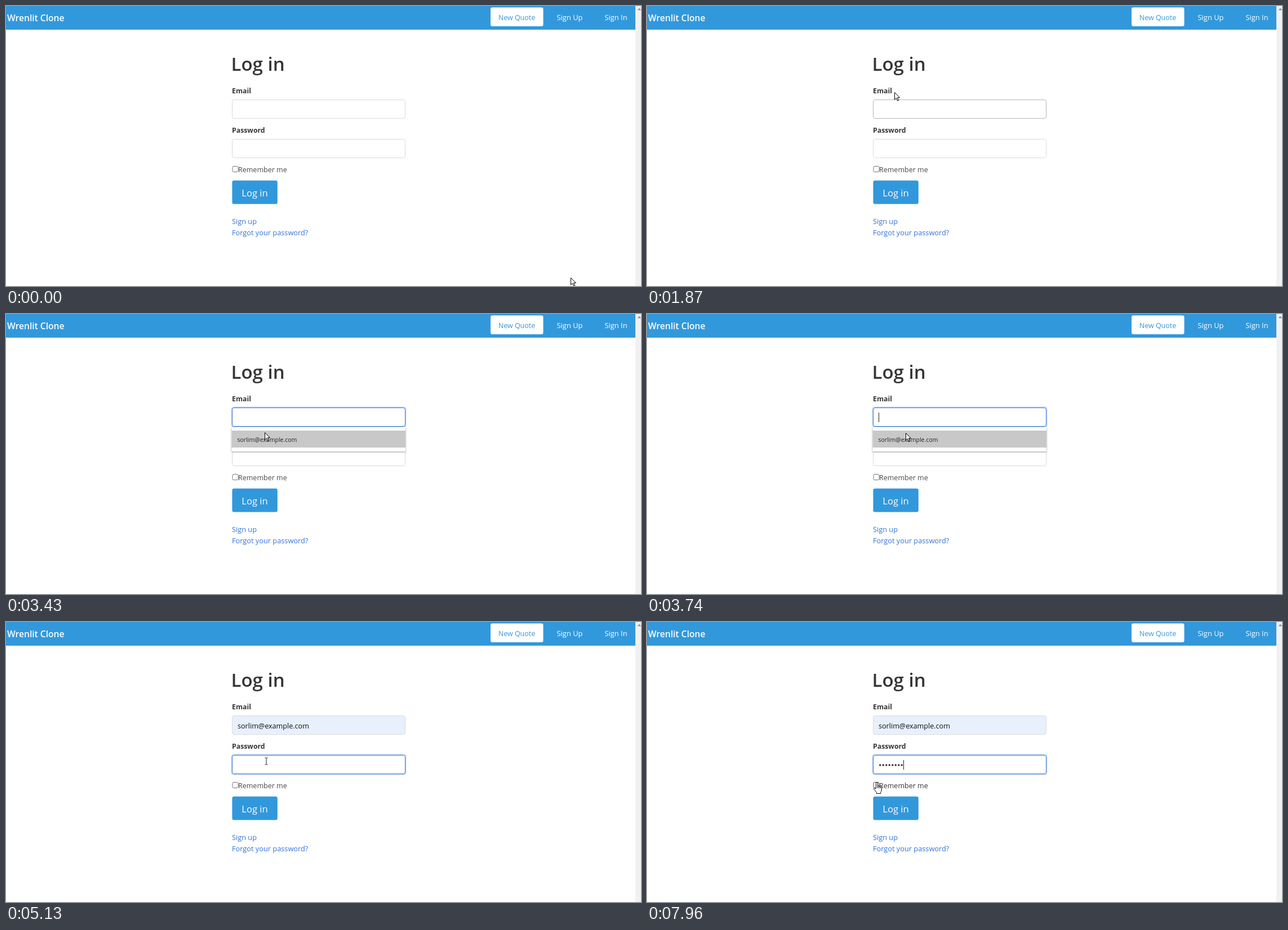
Write an HTML page that moves like this. It is 1127 px wide and 497 px high and loops after 8000 ms.

```html
<!DOCTYPE html>
<html lang="en">
<head>
<meta charset="utf-8">
<title>Log in</title>
<style>
  html, body { margin: 0; width: 100%; height: 100%; overflow: hidden; background: #fff; }
  svg { display: block; width: 1127px; height: 497px; font: 12.6px "Open Sans", "Noto Sans", sans-serif; }
  .label { font-weight: 700; font-size: 12.3px; fill: #363636; }
  .link { font-size: 12.75px; fill: #3273dc; }
  .nav { font-size: 12.9px; fill: #fff; text-anchor: middle; }
  .field { fill: #fff; stroke: #dbdbdb; }
  .field.hover { stroke: #b5b5b5; }
  .field.filled { fill: #e8f0fe; }
  .field.focus { stroke: #3273dc; }
  .ring { fill: none; stroke: #3273dc; stroke-opacity: .25; stroke-width: 3.33; }
  #menu > rect:first-child { filter: drop-shadow(0 1px 1.5px rgba(0, 0, 0, .4)); }
  .pointer { fill: #fff; stroke: #000; stroke-width: 1; stroke-linejoin: round; }
</style>
</head>
<body>
<svg viewBox="0 0 1127 497">
  <rect width="1117" height="42" fill="#3298dc"/>
  <text x="2" y="26.5" font-size="15.6" font-weight="600" fill="#fff">Wrenlit Clone</text>
  <rect x="860" y="2.5" width="93.5" height="33.5" rx="3.3" fill="#fff"/>
  <text class="nav" x="906.5" y="24.5" style="fill:#3298dc;font-size:12.5px">New Quote</text>
  <text class="nav" x="1000.5" y="24.5">Sign Up</text>
  <text class="nav" x="1082.5" y="24.5">Sign In</text>
  <rect x="1117" width="10" height="497" fill="#f1f1f1"/>
  <path d="M1120.5 7.5l3.5-4 3 4z" fill="#8a93ad"/>

  <text x="399.5" y="114.5" font-size="33" font-weight="600" fill="#363636">Log in</text>
  <text class="label" x="401" y="154.5">Email</text>
  <text class="label" x="401" y="224.5">Password</text>

  <rect class="ring" id="emailRing" x="401" y="166" width="308" height="34" rx="3.5"/>
  <rect class="field" id="email" x="401.5" y="166.5" width="307" height="33" rx="3.3"/>
  <text id="address" x="411" y="188.5" fill="#111">sorlim@example.com</text>
  <path id="squiggle" fill="none" stroke="#e33" stroke-width=".9"/>

  <rect class="ring" id="passwordRing" x="401" y="236" width="308" height="34" rx="3.5"/>
  <rect class="field" id="password" x="401.5" y="236.5" width="307" height="33" rx="3.3"/>
  <g id="dots" fill="#363636"></g>
  <rect id="caret" width="1" height="17" fill="#222"/>

  <rect id="box" x="402" y="284.5" width="10" height="10" rx="2" fill="#fff" stroke="#767676"/>
  <text id="remember" x="412" y="294.7" font-size="12.5">Remember me</text>
  <rect x="401.4" y="309.8" width="80.4" height="41.7" rx="3.3" fill="#3298dc"/>
  <text x="441.5" y="337.5" font-size="16.6" fill="#fff" text-anchor="middle">Log in</text>
  <text class="link" x="401" y="386.7">Sign up</text>
  <text class="link" x="401" y="406.7">Forgot your password?</text>

  <g id="menu">
    <rect x="400.5" y="201" width="308.5" height="43" fill="#fff"/>
    <rect id="option" x="400.5" y="207" width="308.5" height="30" fill="#c8c8c8"/>
    <text x="410.5" y="226.5" font-size="10.5" fill="#222">sorlim@example.com</text>
  </g>

  <path class="pointer" id="arrow" d="M.5.5v12.6l3-2.8 2.2 5 2-.9-2.2-4.8h4z"/>
  <path id="beam" fill="none" stroke="#222" d="M-2.5-6h2l.5.5.5-.5h2M0-5.5v11M-2.5 6h2l.5-.5.5.5h2"/>
  <path class="pointer" id="hand" d="M-1.5 10V1.2Q-1.4-.5 0-.5t1.5 1.7V6Q3 4.8 4 6.6 5.5 5.6 6.3 7.3 8 6.6 8.3 8.5V13Q8 16 6.5 17.5V19.5H-.5V17.8L-5 12Q-6 10-4.5 9.5-3.2 9.2-1.5 11.5M1.5 6v4M4 6.6V10M6.3 7.3V10"/>
</svg>
<script>
const DURATION = 8000;
const DOT_PITCH = 5.5, TEXT_LEFT = 411;
const typed = [5760, 5830, 6060, 6300, 6380, 6530, 6610, 6760];

// Stepped mouse moves: first step time, last step time, steps, end x, end y
const start = [1002, 482];
const moves = [
  [70, 70, 1, 937, 447],
  [310, 790, 8, 710, 332],
  [1170, 1640, 7, 476, 90],
  [1720, 1870, 3, 439, 153],
  [1950, 1950, 1, 439, 160],
  [2020, 2100, 2, 439, 171],
  [2250, 2410, 3, 444, 165],
  [2590, 2710, 3, 445, 168],
  [3200, 3430, 4, 459, 210],
  [3510, 3900, 6, 459, 211],
  [4080, 4440, 6, 462, 247],
  [7390, 7960, 8, 408, 285],
];

const el = Object.fromEntries([...document.querySelectorAll('[id]')].map(e => [e.id, e]));
const show = (e, on) => e.setAttribute('visibility', on ? 'visible' : 'hidden');
const between = (v, a, b) => v >= a && v < b;

for (let i = 0; i < typed.length; i++) {
  const dot = document.createElementNS(el.dots.namespaceURI, 'circle');
  dot.setAttribute('cx', TEXT_LEFT + DOT_PITCH * (i + .5));
  dot.setAttribute('cy', 254);
  dot.setAttribute('r', 1.8);
  el.dots.append(dot);
}

const userWidth = el.address.getSubStringLength(0, 6);
el.squiggle.setAttribute('d', `M${TEXT_LEFT} 191.5` + 'l2-2 2 2'.repeat(Math.round(userWidth / 4)));

function mouseAt(t) {
  let [x, y] = start;
  for (const [from, to, steps, endX, endY] of moves) {
    if (t < from) break;
    const interval = (to - from) / Math.max(1, steps - 1);
    const step = t >= to ? steps : Math.floor((t - from) / interval) + 1;
    x += (endX - x) * step / steps;
    y += (endY - y) * step / steps;
  }
  return [x, y];
}

function caretOn(t) {
  return between(t, 2590, 3200) || between(t, 3730, 4430) || between(t, 4590, 5130) ||
    between(t, 5680, 7310) || t >= 7840;
}

function render(t) {
  const [x, y] = mouseAt(t);
  const menuOpen = between(t, 2650, 3900);
  const filled = t >= 3900;
  const emailFocus = between(t, 2590, 4590);
  const passwordFocus = t >= 4590;
  const count = typed.filter(time => t >= time).length;

  const inColumn = between(x, 401, 709);
  const overEmail = inColumn && between(y, 163, 200);
  const overPassword = inColumn && !menuOpen && between(y, 236, 270);
  const overRemember = between(x, 401, 498) && between(y, 280, 300);

  el.email.classList.toggle('hover', overEmail || inColumn && between(y, 140, 160));
  el.email.classList.toggle('filled', filled);
  el.email.classList.toggle('focus', emailFocus);
  el.password.classList.toggle('hover', overPassword || inColumn && !menuOpen && between(y, 210, 230));
  el.password.classList.toggle('focus', passwordFocus);
  show(el.emailRing, emailFocus);
  show(el.passwordRing, passwordFocus);
  show(el.address, filled);
  show(el.squiggle, filled && emailFocus);
  [...el.dots.children].forEach((dot, i) => show(dot, i < count));

  show(el.caret, caretOn(t));
  const textWidth = passwordFocus ? count * DOT_PITCH
    : filled ? el.address.getComputedTextLength() + 1 : 0;
  el.caret.setAttribute('x', Math.round(TEXT_LEFT + textWidth - .1));
  el.caret.setAttribute('y', passwordFocus ? 245 : 175);

  el.menu.style.display = menuOpen ? '' : 'none';
  show(el.option, menuOpen && y >= 205);
  el.box.setAttribute('stroke', overRemember ? '#4f4f4f' : '#767676');
  el.remember.setAttribute('fill', overRemember ? '#363636' : '#4a4a4a');

  const pointer = overRemember ? el.hand : overEmail || overPassword ? el.beam : el.arrow;
  for (const e of [el.arrow, el.beam, el.hand]) show(e, e === pointer);
  pointer.setAttribute('transform', `translate(${Math.round(x)} ${Math.round(y)})`);
}

function tick() {
  render(performance.now() % DURATION);
  requestAnimationFrame(tick);
}
tick();
</script>
</body>
</html>
```
